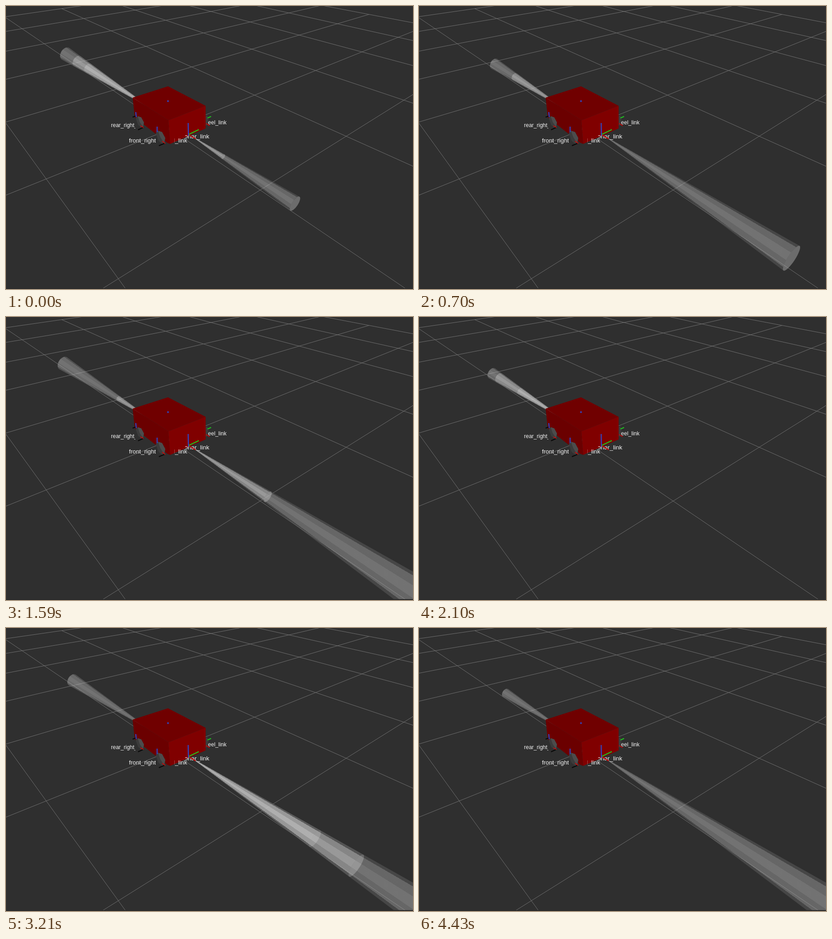
Recreate the animation shown at these times as an HTML page with a canvas. Size 897 by 624 pixels, loop 4.47 s.

```html
<!DOCTYPE html>
<html lang="en">
<head>
<meta charset="utf-8">
<title>Sonar ranges</title>
<style>
html, body { margin: 0; width: 100%; height: 100%; overflow: hidden; background: #2f2f2f; }
canvas { display: block; }
</style>
</head>
<body>
<canvas id="view" width="897" height="624"></canvas>
<script>
const W = 897, H = 624, LOOP = 4470;
const ctx = document.getElementById('view').getContext('2d');

// Both sonars ping at 5 Hz and the last three readings stay in view.
// A reading is the screen x of its cone's end; 0 is too near to see.
const FIRST = 60, PERIOD = 200, KEEP = 3, FAR = 1100;
const frontEnds = [0, 637, 479, 0, 821, 0, 0, FAR, 0, FAR, 577, 0, 0, 0, 505, FAR,
                   681, 772, FAR, 604, 0, 0, 0, FAR, 0];
const rearEnds = [131, 157, 181, 0, 166, 211, 0, 0, 0, 248, 126, 161, 223, 177, 153, 245,
                  146, 0, 0, 160, 148, 226, 0, 191, 0];

const grey = v => `rgba(${v},${v},${v},0.43)`;

function stroke(color, width, x1, y1, x2, y2) {
  ctx.strokeStyle = color;
  ctx.lineWidth = width;
  ctx.beginPath();
  ctx.moveTo(x1, y1);
  ctx.lineTo(x2, y2);
  ctx.stroke();
}

function poly(color, ...p) {
  ctx.fillStyle = color;
  ctx.beginPath();
  for (let i = 0; i < p.length; i += 2) ctx.lineTo(p[i], p[i + 1]);
  ctx.closePath();
  ctx.fill();
}

// Ground grid: two families of lines, each meeting at a vanishing point.
// Parallels are evenly spaced in the inverse of their height below the horizon.
function through(vx, vy, x, drop) {
  const k = drop / (x - vx);
  return { k, c: vy - k * vx };
}
const lineA = i => through(-329, -197, W, 1 / (0.0012031 + 0.000614 * i));
function lineB(j) {
  const y = 1 / (0.001626 - 0.000578 * j) - 198;
  return through(1520.5, -195, 0, y + 195);
}
const crossing = (p, q) => (q.c - p.c) / (p.k - q.k);

function drawGrid() {
  const put = (l, x1, x2) =>
    stroke('#777', 0.9, x1, l.k * x1 + l.c, x2, l.k * x2 + l.c);
  const back = lineB(-5), side = lineA(5);
  for (let i = -1; i <= 5; i++) put(lineA(i), crossing(lineA(i), back), 1000);
  for (let j = -5; j <= 1; j++) put(lineB(j), -100, crossing(lineB(j), side));
}

// Five visible facets of a ten-sided cone, lit from the viewer
function facets(half, ambient) {
  const g = ctx.createConicGradient(-half, 0, 0);
  const turn = Math.PI / 5;
  const at = k => (Math.sin(k * turn) + 1) * half / (2 * Math.PI);
  for (let k = -2; k <= 2; k++) {
    const color = grey(Math.round(ambient + (203 - ambient) * Math.cos(k * turn)));
    g.addColorStop(at(k - 0.5), color);
    g.addColorStop(at(k + 0.5), color);
  }
  return g;
}

// A cone from its tip; a capped one shows its end disc
function cone({ x, y, angle, d, a, b, ambient, capped }) {
  const touch = Math.acos(-b / d);
  ctx.save();
  ctx.translate(x, y);
  ctx.rotate(angle);
  ctx.fillStyle = facets(Math.atan(a / d), ambient);
  ctx.beginPath();
  ctx.moveTo(0, 0);
  ctx.ellipse(d, 0, b, a, 0, -touch, touch, capped);
  ctx.closePath();
  ctx.fill();
  if (capped) {
    ctx.fillStyle = grey(188);
    ctx.beginPath();
    ctx.ellipse(d, 0, b, a, 0, 0, 2 * Math.PI);
    ctx.fill();
  }
  ctx.restore();
}

function frontCone(end) {
  const x = 405, y = 284, angle = Math.atan(0.654), dx = end - x;
  const b = dx * Math.max(0.008, 0.04 - 0.00005 * dx);
  cone({ x, y, angle, d: dx / Math.cos(angle), a: 0.0784 * dx, b, ambient: 55, capped: true });
}

function rearCone(end) {
  const x = 324, y = 228.3, angle = Math.atan(0.638), dx = x - end;
  cone({ x, y, angle: angle + Math.PI, d: dx / Math.cos(angle), a: 0.079 * dx,
         b: 0.053 * dx, ambient: 90, capped: false });
}

// Text of which only the span from x1 to x2 is in sight
function label(text, size, x, y, x1, x2) {
  ctx.save();
  ctx.beginPath();
  ctx.rect(x1, y - 14, x2 - x1, 20);
  ctx.clip();
  ctx.fillStyle = '#f4f4f4';
  ctx.font = `${size}px "Liberation Sans", Arial, sans-serif`;
  ctx.fillText(text, x, y);
  ctx.restore();
}

function wheel(x, y, size) {
  ctx.save();
  ctx.translate(x, y);
  ctx.scale(size, size);
  poly('#3b3b3b', -10, -10, -5, -15, 4, -12, 11, 1, 10, 11, 4, 14, -4, 7);
  poly('#4c4c4c', -5, -15, 4, -12, 11, 1, 8, 12, 0, -1);
  ctx.restore();
}

function drawRobot() {
  const blue = '#2a4bd0', red = '#c40a0a', green = '#1fc41f', dark = '#080808';

  poly('#3c3c3c', 440, 243, 444, 241, 446, 250, 444, 262, 440, 264);
  poly('#6b0000', 279, 202, 358, 252, 362, 304, 356, 302, 325, 278, 284, 246);
  poly('#800000', 358, 252, 440, 220, 440, 270, 362, 304);
  poly('#700000', 279, 202, 357, 177, 440, 220, 358, 252);
  wheel(294.5, 256, 0.87);
  wheel(340, 290, 1);

  stroke(dark, 2, 279, 245, 288, 242);
  stroke(dark, 2.2, 291, 273, 302, 268);
  stroke(dark, 2.2, 337, 308, 349, 303);
  stroke(blue, 2.2, 286, 234, 287, 245);
  stroke(blue, 2.2, 333, 266, 333, 278);
  stroke(red, 2, 296, 264, 303, 268);
  stroke(red, 2, 344, 298, 351, 303);
  stroke(green, 2.2, 444, 247, 452, 243.5);
  stroke(red, 2, 441, 259, 449, 264);

  label('rear_right_wheel_link', 12, 231.5, 267, 225, 285);
  label('front_right_wheel_link', 13.2, 271, 301, 265, 330);
  label('front_right_wheel_link', 13.2, 271, 301, 371, 405);
  label('wheel_link', 12, 430, 261, 445, 495);
  label('sonar_link', 13.5, 386.5, 292, 395, 455);

  stroke(red, 2.2, 403, 284, 418, 293);
  stroke(green, 2.2, 403, 283, 425, 272.5);
  stroke(blue, 2.2, 401.5, 258, 402, 286);
  ctx.fillStyle = blue;
  ctx.fillRect(355.5, 208, 3, 3.5);
}

function draw() {
  const t = performance.now() % LOOP;
  const pings = Math.max(0, Math.floor((t - FIRST) / PERIOD) + 1);
  const recent = list => list.slice(pings, pings + KEEP).filter(Boolean);
  ctx.fillStyle = '#2f2f2f';
  ctx.fillRect(0, 0, W, H);
  drawGrid();
  recent(rearEnds).forEach(rearCone);
  recent(frontEnds).forEach(frontCone);
  drawRobot();
  ctx.fillStyle = '#292929';
  ctx.fillRect(0, 622, W, 2);
  requestAnimationFrame(draw);
}
draw();
</script>
</body>
</html>
```
